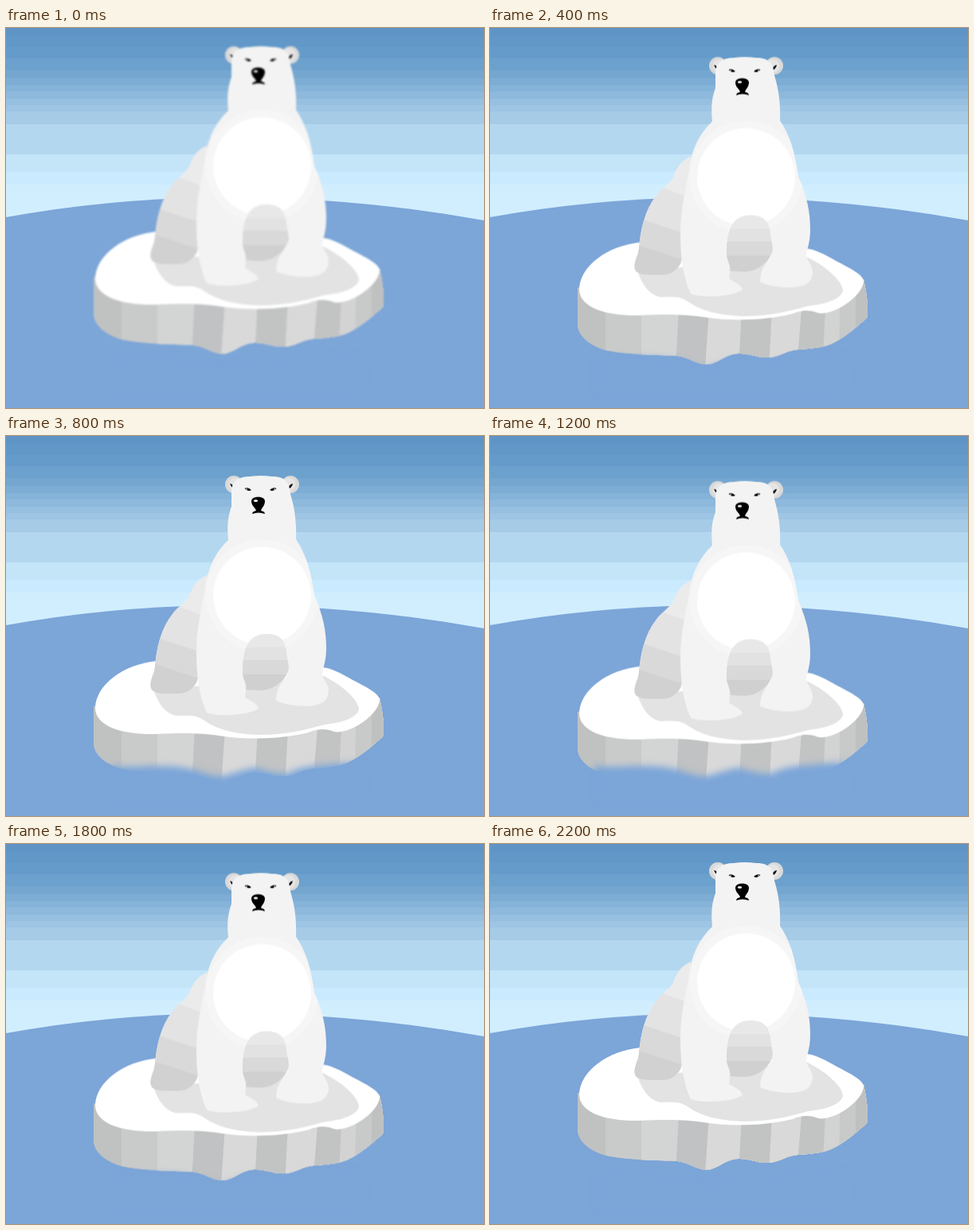
An HTML page for the animation above (2.3 s loop, 600 px wide and 478 px high).

```html
<!DOCTYPE html>
<html lang="en">
<head>
<meta charset="utf-8">
<title>Polar bear on a floe</title>
<style>
  html, body { margin: 0; width: 100%; height: 100%; overflow: hidden; background: #7ca5d8; }
  svg { display: block; width: 100vw; height: 100vh; }
  /* 23 ticks of 100 ms: 11 down, 11 up, one rest */
  #float { animation: bob 2300ms infinite; }
  #soft { animation: focus 2300ms step-end infinite; }
  @keyframes bob {
    0% { transform: translateY(0); animation-timing-function: steps(11, end); }
    47.826% { transform: translateY(37px); animation-timing-function: steps(11, end); }
    95.652%, 100% { transform: translateY(0); }
  }
  @keyframes focus {
    0% { filter: blur(.9px); }
    4.348%, 100% { filter: none; }
  }
</style>
</head>
<body>
<svg viewBox="0 0 600 478" preserveAspectRatio="none">
  <defs>
    <clipPath id="sideClip">
      <path d="M110 313V362C112 377 130 388 146 392C175 398 215 398 235 399C250 401 260 410 272 410C286 409 295 397 311 396C325 395 335 402 352 401C365 399 373 392 386 391C405 390 420 388 430 383C445 376 462 361 473 351C475 344 474 325 469 303L300 290Z"/>
    </clipPath>
    <clipPath id="hindClip">
      <path d="M252 148C238 154 234 164 230 174C225 183 215 188 209 197C194 216 189 240 187 264C186 274 180 280 182 290C185 298 200 297 215 297C228 297 234 291 239 283L256 230Z"/>
    </clipPath>
    <clipPath id="gapClip">
      <path d="M301 292C304 285 297 282 297 268C298 247 300 222 327 222C345 222 351 231 352 246C353 255 356 262 354 269C348 283 335 293 318 293Z"/>
    </clipPath>
    <clipPath id="bodyClip">
      <path id="body" d="M283 46C282 31 290 24 306 24Q320 22 334 24C350 24 356 31 357 46C361 60 365 76 364 103C376 120 383 143 387 174C398 198 402 218 402 240C402 258 397 266 397 274C400 282 405 286 405 294C404 308 394 312 378 313C361 313 347 310 339 306C340 292 342 288 354 272L300 274C298 281 303 288 300 302C308 307 315 309 317 316C307 322 292 324 276 324Q252 324 251 319C243 300 239 278 239 245C239 211 247 184 250 164C253 139 263 119 279 104C277 86 279 72 283 62Z"/>
    </clipPath>
    <filter id="haze" x="-10%" y="-50%" width="120%" height="200%">
      <feGaussianBlur stdDeviation="4"/>
    </filter>
  </defs>

  <g id="sky"></g>
  <path fill="#7ca5d8" d="M0 238Q285 186 600 242V478H0Z"/>

  <g id="float"><g id="soft">
    <g id="side" clip-path="url(#sideClip)"></g>
    <path fill="#fff" d="M112 315C112 339 148 349 188 348C225 346 247 347 267 350C305 356 347 354 380 346C394 340 403 342 412 345C432 349 470 322 469 304C467 295 446 286 430 277C416 269 407 265 397 264L190 256C147 260 113 286 112 315Z"/>
    <path fill="#e3e3e3" d="M185 292C190 306 198 322 214 325C228 325 238 323 249 331C266 343 289 348 318 349C350 349 375 343 400 336C422 334 442 327 443 316C441 304 424 288 399 275Z"/>

    <g clip-path="url(#hindClip)">
      <path fill="#ebebeb" d="M175 140H260V310H175Z"/>
      <path fill="#e3e3e3" d="M175 172L260 204V310H175Z"/>
      <path fill="#d9d9d9" d="M175 222L260 250V310H175Z"/>
      <path fill="#d1d1d1" d="M175 256L260 284V310H175Z"/>
    </g>

    <g id="ears">
      <circle cx="286" cy="34" r="11" fill="#d9d9d9"/>
      <circle cx="288" cy="34" r="8.5" fill="#e5e5e5"/>
      <path fill="#000" d="M281 33Q286 34 287 40Q283 38 281 33Z"/>
      <circle cx="357" cy="34" r="11" fill="#d9d9d9"/>
      <circle cx="355" cy="34" r="8.5" fill="#e5e5e5"/>
      <path fill="#000" d="M360 33Q355 34 354 40Q359 38 360 33Z"/>
    </g>

    <use href="#body" fill="#f3f3f3"/>
    <g clip-path="url(#bodyClip)">
      <circle cx="321.5" cy="174" r="71" fill="#f7f6f6"/>
      <circle cx="321.5" cy="174" r="61.5" fill="#fff"/>
    </g>

    <g clip-path="url(#gapClip)">
      <path fill="#e8e8e8" d="M290 215H360V300H290Z"/>
      <path fill="#e2e2e2" d="M290 239H360V300H290Z"/>
      <path fill="#d9d9d9" d="M290 255H360V300H290Z"/>
      <path fill="#d0d0d0" d="M290 273H360V300H290Z"/>
    </g>

    <g id="face">
      <path d="M299.5 39Q304 37 308 41Q303 43.500 299.500 39Z"/>
      <path d="M339.500 39Q335 37 331 41Q336 43.500 339.500 39Z"/>
      <path fill="#fff" d="M301 39.500h2v1h-2ZM336 39.500h2v1h-2Z"/>
      <path d="M308 55C308 48 325 48 325 55C325 61 321 63 320 67Q325 68 325 71Q317 68 309 71Q309 68 314 67C313 63 308 61 308 55Z"/>
      <ellipse cx="313.500" cy="54.500" rx="2.700" ry="1.600" fill="#eee"/>
    </g>
  </g></g>

  <path fill="#7ca5d8" filter="url(#haze)" d="M130 415Q155 417 180 415Q220 414 240 421Q258 428 272 428Q290 422 311 417Q332 424 352 425Q370 416 387 415Q412 413 430 411L452 412V460H130Z"/>
</svg>
<script>
  const add = (id, tag, attrs) => {
    const el = document.createElementNS("http://www.w3.org/2000/svg", tag);
    for (const key in attrs) el.setAttribute(key, attrs[key]);
    document.getElementById(id).append(el);
  };

  // Sky: each band runs from its top edge down past the horizon
  const bands = [
    [0, "#5f95c6"], [11, "#6298c8"], [24, "#659bca"], [38, "#6ca0cd"],
    [53, "#74a6d0"], [63, "#7dacd4"], [72, "#86b3d8"], [80, "#8eb9dc"],
    [89, "#97c0e0"], [97, "#9ec5e3"], [105, "#a5cbe7"], [121, "#b4d7f0"],
    [159, "#c4e4f8"], [181, "#caeaff"], [197, "#d1eefe"]
  ];
  for (const [y, fill] of bands) add("sky", "rect", { y, width: 600, height: 250 - y, fill });

  // Ice facets: top x, bottom x, colour
  const facets = [
    [100, 100, "#c0c2c2"], [145, 145, "#c9cbca"], [190, 190, "#d3d4d4"],
    [237, 233, "#c0c2c3"], [275, 270, "#d9d9d9"], [316, 312, "#c2c4c4"],
    [354, 350, "#d9d9d9"], [391, 385, "#c2c4c4"], [421, 417, "#d3d3d3"],
    [439, 438, "#c8c9c9"], [459, 459, "#bfc1c1"]
  ];
  for (const [top, foot, fill] of facets)
    add("side", "path", { d: `M${top} 340L${foot} 415H490V280H${top}Z`, fill });
</script>
</body>
</html>
```
